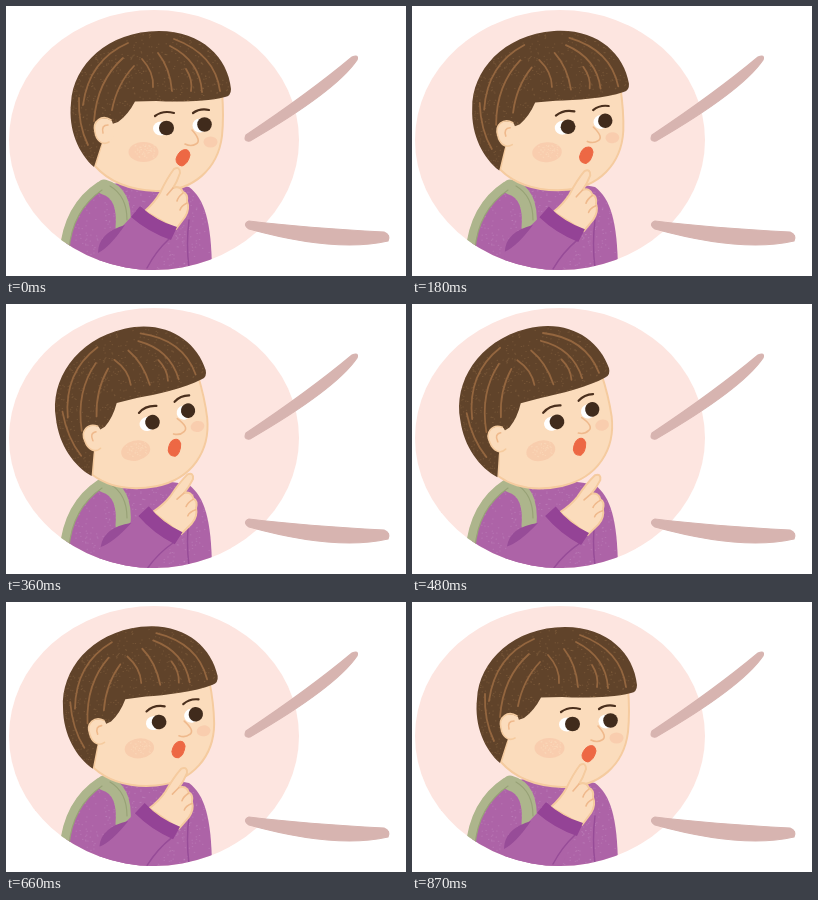
Recreate the animation shown at these times as an HTML page. Size 400x270 px, loop 0.9 s.

```html
<!DOCTYPE html>
<html lang="en">
<head>
<meta charset="utf-8">
<title>Wondering child</title>
<style>
  html, body { margin: 0; width: 100%; height: 100%; overflow: hidden; background: #fff; }
  svg { display: block; width: 400px; height: 270px; }
  .line { fill: none; stroke-linecap: round; stroke-linejoin: round; }
  .skin { fill: #fbdcbc; stroke: #f5cb9f; stroke-width: 2; stroke-linejoin: round; }
  .purple { fill: #ad63a7; }
  .fold { stroke: #974c98; stroke-width: 1.5; }
  .crease { stroke: #efb98c; stroke-width: 1.6; }
  .strand { stroke: #94663f; stroke-width: 1.8; }
  .brow { stroke: #4a2f1d; stroke-width: 2.2; }
  .dark { fill: #402b1c; }
  .blush { fill: #f8caab; opacity: .85; }
  .tail { fill: #d7b4b0; stroke: #d7b4b0; stroke-width: 1.2; }
</style>
</head>
<body>
<svg viewBox="0 0 400 270">
  <defs>
    <clipPath id="disc"><ellipse cx="148" cy="134" rx="145" ry="130"/></clipPath>
    <path id="hairShape" d="M88 161 C73 148 62 124 65 97 C67 59 102 25 153 25 C196 25 222 52 225 83 Q225 90 219 91 C200 96 170 96 150 95 L129 95.500 Q122 109 112 116 L103 119 Q94 140 88 161Z"/>
    <path id="bodyShape" d="M56 270 Q58 208 97 179 Q140 172 183 181 C199 193 206 217 206 270Z"/>
    <clipPath id="hairClip"><use href="#hairShape"/></clipPath>
    <clipPath id="bodyClip"><use href="#bodyShape"/></clipPath>
  </defs>

  <ellipse cx="148" cy="134" rx="145" ry="130" fill="#fde5e0"/>
  <path class="tail" d="M240 129 Q303 87 346 51 Q353 48 351 54 Q330 85 244 135 Q237 136 240 129Z"/>
  <path class="tail" d="M243 215 Q300 222 378 226 Q385 229 382 235 Q330 247 243 223 Q236 218 243 215Z"/>

  <g clip-path="url(#disc)">
    <use href="#bodyShape" class="purple"/>
    <g id="bodyDots" clip-path="url(#bodyClip)"></g>
    <path class="line" stroke="#adb58c" stroke-width="9" d="M58 246 Q62 201 94 180"/>
    <path class="line" stroke="#adb58c" stroke-width="15" d="M98 181 Q120 187 117 222"/>
    <path class="line" stroke="#98a277" stroke-width="1.2" d="M63 244 Q66 205 96 184 M104 180 Q121 190 121 214"/>
    <path class="line fold" d="M183 214 Q180 238 183 262"/>
  </g>

  <g id="head">
    <path class="skin" d="M100 95 L95 140 L89 160 C103 176 125 184 150 185 C188 186 212 162 216 130 Q218 110 216 86 L140 70Z"/>
    <use href="#hairShape" fill="#60432a"/>
    <g id="hairDots" clip-path="url(#hairClip)"></g>
    <path class="line strand" d="M168 33 Q209 48 214 85 M164 40 Q194 55 196 86 M152 47 Q164 62 166 85 M136 53 Q148 66 147 81
      M122 37 Q83 54 77 99 M117 52 Q91 75 88 115 M128 60 Q111 78 106 104 M73 92 Q72 119 82 139 M180 63 Q187 74 185 85"/>
    <path fill="#fbdcbc" d="M106 115 C96 108 86 115 89 126 C90 134 96 140 103 136 L110 128Z"/>
    <path class="line" stroke="#f5cb9f" stroke-width="1.6" d="M105 114 C96 108 86 115 89 126 C90 134 96 140 103 136"/>
    <path class="line crease" d="M102 119 Q95 119 97 127"/>
    <ellipse class="blush" cx="137.500" cy="146" rx="15" ry="10"/>
    <ellipse class="blush" cx="204.500" cy="136" rx="7" ry="5.500"/>
    <g id="blushDots"></g>
    <ellipse cx="155" cy="122.500" rx="8" ry="7" fill="#fff"/>
    <ellipse class="dark" cx="160.500" cy="122" rx="7.500" ry="7.300"/>
    <ellipse cx="194" cy="119.500" rx="7.500" ry="7" fill="#fff"/>
    <ellipse class="dark" cx="198.500" cy="118.500" rx="7.300" ry="7.300"/>
    <path class="line brow" d="M149 110 Q157 104 168 107 M187 107 Q194 102 203 104"/>
    <path class="line crease" d="M186 124 Q196 135 190 138 Q185 141 179 138"/>
    <path fill="#ed6844" stroke="#ed6844" d="M177 144 Q183 142 184 149 Q182 158 176 160 Q170 159 170 153 Q172 146 177 144Z"/>
  </g>

  <g clip-path="url(#disc)">
    <g id="arm">
      <path class="purple" d="M127 209 L92 246 L92 285 L140 285 L164 232Z"/>
      <path fill="#974c98" d="M119 219 Q92 227 92 247 Q104 241 119 219Z"/>
      <path class="line fold" d="M163 233 Q150 245 141 262"/>
      <path class="skin" d="M139 205 Q149 196 154 187 Q161 172 168 163 Q174 160 174 167 Q171 176 167 182 Q174 179 177 186 Q182 188 181 195 Q184 203 179 211 L170 223Z"/>
      <path class="line crease" d="M167 182 L161 189 M177 187 Q172 191 171 195 M181 197 Q175 200 174 204"/>
      <path fill="#944396" d="M134 200 Q150 215 171 221 L165 234 Q142 226 125 211Z"/>
    </g>
  </g>
</svg>
<script>
const LOOP = 900, STEP = 30;
const el = id => document.getElementById(id);

let seed = 7;
const rand = () => (seed = seed * 16807 % 2147483647) / 2147483647;

// Grainy crayon texture
function grain(id, count, [x, y, w, h], color, opacity) {
  let d = '';
  for (let i = 0; i < count; i++) {
    d += `M${(x + rand() * w).toFixed(1)} ${(y + rand() * h).toFixed(1)}h.6`;
  }
  el(id).innerHTML = `<path class="line" stroke="${color}" opacity="${opacity}" d="${d}"/>`;
}
grain('hairDots', 900, [62, 24, 164, 138], '#8a6642', .5);
grain('bodyDots', 450, [57, 178, 150, 88], '#c085be', .5);
grain('blushDots', 45, [127, 139, 22, 13], '#fbdcbc', .6);

const ease = x => (1 - Math.cos(Math.PI * Math.min(1, Math.max(0, x)))) / 2;
const lean = t => 1.12 * (t < 450 ? ease((t - 30) / 420) : ease((855 - t) / 405));

// Tilt and slight narrowing around the middle of the face
function headMatrix(p) {
  const cx = 150, cy = 120;
  const a = 1 - .045 * p, b = -.215 * p, c = .215 * p, d = 1 - .02 * p;
  const e = cx - 14 * p - a * cx - c * cy;
  const f = cy - 1.5 * p - b * cx - d * cy;
  return `matrix(${a} ${b} ${c} ${d} ${e} ${f})`;
}

function draw(now) {
  const t = Math.floor(now % LOOP / STEP) * STEP;
  const p = lean(t);
  el('head').setAttribute('transform', headMatrix(p));
  el('arm').setAttribute('transform', `rotate(${8 * p} 122 264)`);
}

const start = performance.now();
function tick() {
  draw(performance.now() - start);
  requestAnimationFrame(tick);
}
tick();
</script>
</body>
</html>
```
